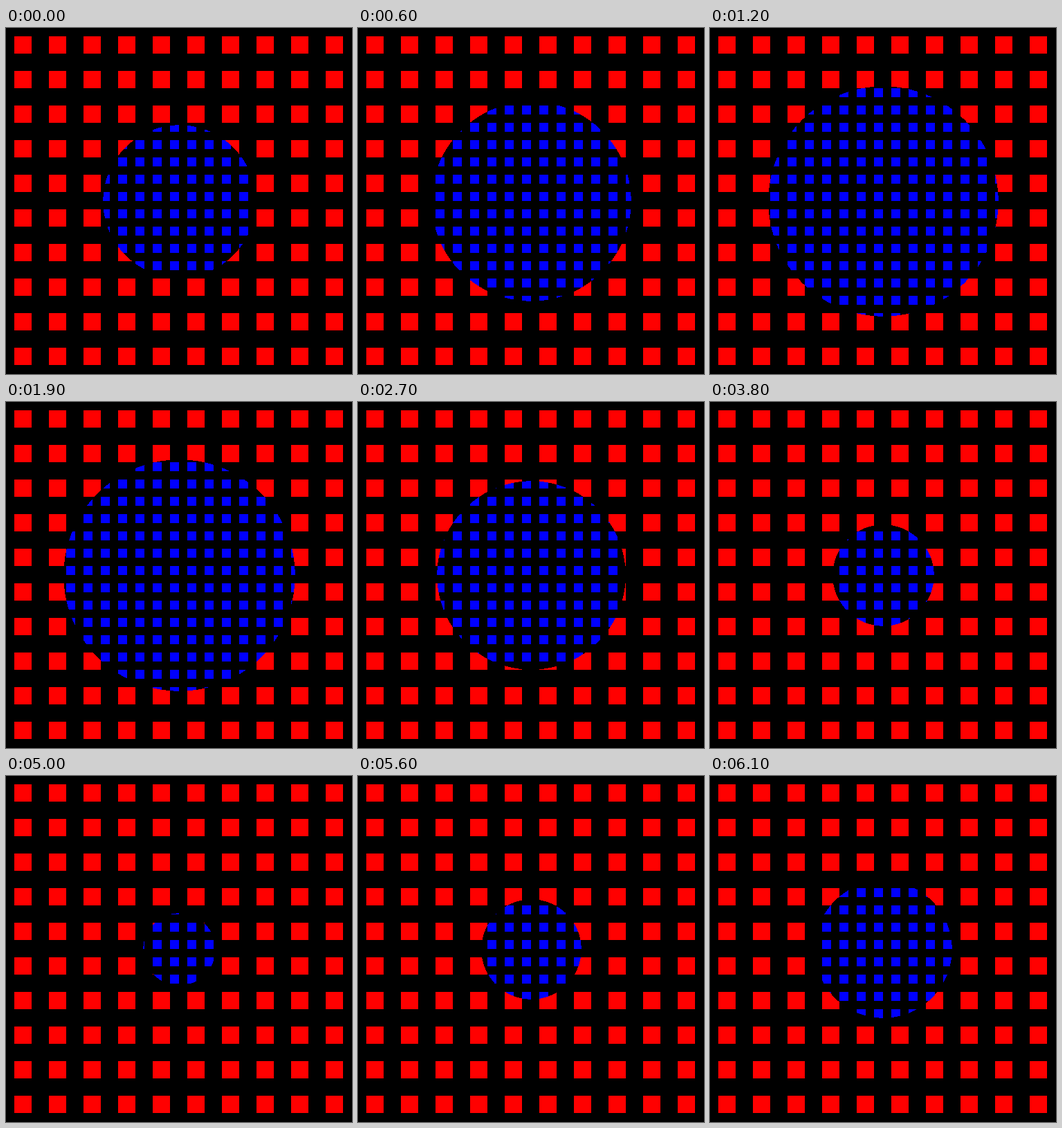
An HTML page with a canvas that plays this animation: 500x500 px, repeating every 6200 ms.

```html
<!DOCTYPE html>
<html>
<head>
<meta charset="utf-8">
<title>Grid lens</title>
<style>
  html, body { margin: 0; width: 100%; height: 100%; overflow: hidden; background: #000; }
  canvas { display: block; }
</style>
</head>
<body>
<canvas id="stage" width="500" height="500"></canvas>
<script>
  const SIZE = 500, MID = 250, LOOP = 6200, STEP = 100;
  const RED = 0xff0000ff, BLUE = 0xffff0000, BLACK = 0xff000000; // ABGR
  const ctx = document.getElementById('stage').getContext('2d');
  const image = ctx.createImageData(SIZE, SIZE);
  const pixels = new Uint32Array(image.data.buffer);

  const inCoarse = v => v % 50 >= 12 && v % 50 < 37;
  const inFine = v => v % 25 >= 12;

  function draw(step) {
    const radius = Math.round(110 + 60 * Math.sin(step / 10));
    const limit = (radius + 0.2) ** 2;
    for (let y = 0, i = 0; y < SIZE; y++) {
      for (let x = 0; x < SIZE; x++, i++) {
        const inside = (x - MID) ** 2 + (y - MID) ** 2 <= limit;
        const hit = inside ? inFine : inCoarse;
        pixels[i] = hit(x) && hit(y) ? (inside ? BLUE : RED) : BLACK;
      }
    }
    ctx.putImageData(image, 0, 0);
  }

  const start = performance.now();
  let shown = 0;
  draw(0);

  function tick() {
    const step = Math.floor(((performance.now() - start) % LOOP) / STEP);
    if (step !== shown) draw(shown = step);
    requestAnimationFrame(tick);
  }
  requestAnimationFrame(tick);
</script>
</body>
</html>
```
